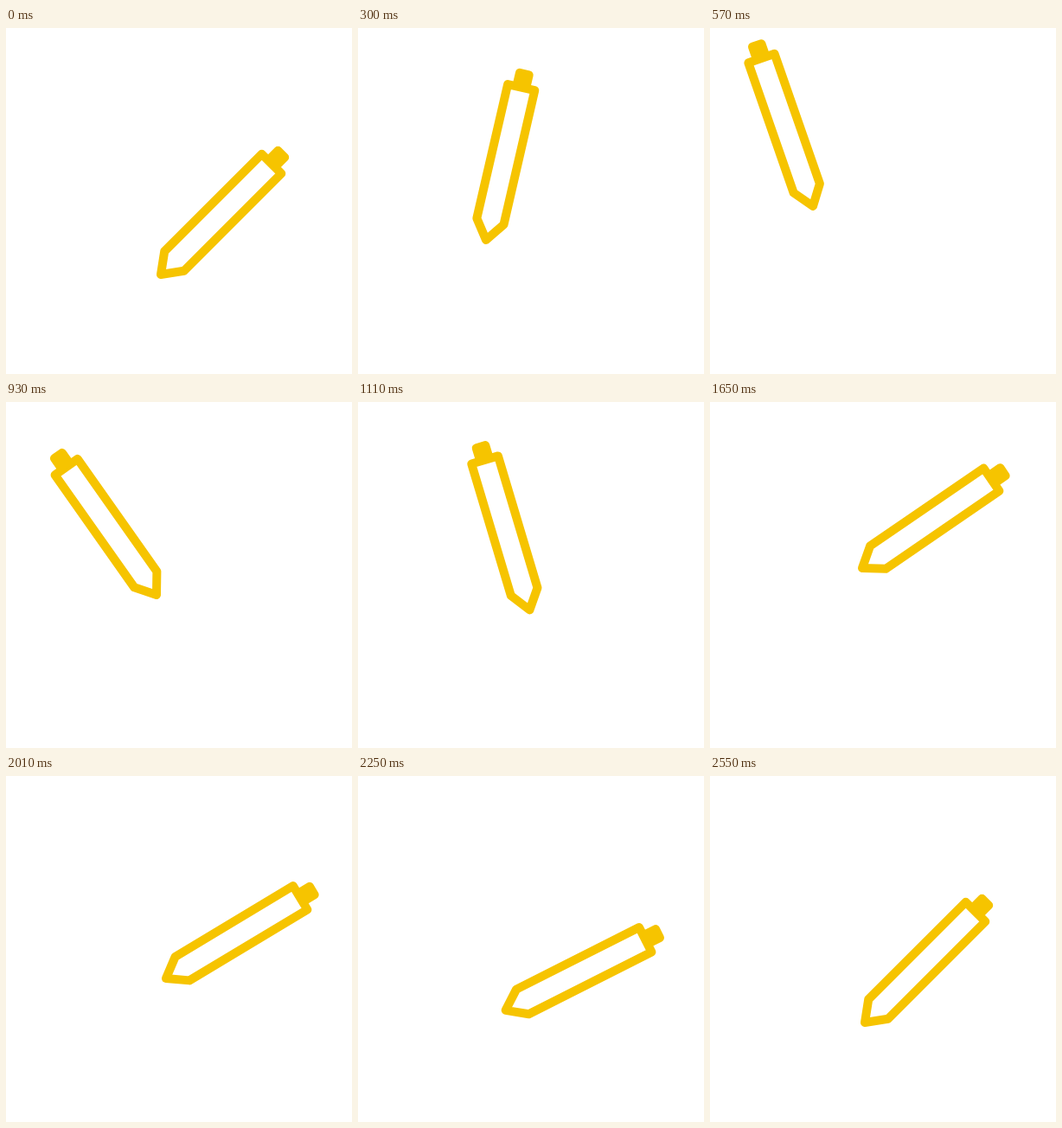
Recreate the animation shown at these times as an HTML page. Size 400 by 400 pixels, loop 3.11 s.

```html
<!DOCTYPE html>
<html lang="en">
<head>
<meta charset="utf-8">
<title>Writing pen</title>
<style>
  html, body { margin: 0; width: 100%; height: 100%; overflow: hidden; background: #fff; }
  svg { display: block; width: 100%; height: 100%; }
</style>
</head>
<body>
<svg viewBox="0 0 400 400">
  <g id="pen">
    <path d="M0 0L16-22V-181H-16V-22Z" fill="#fff" stroke="#f6c400" stroke-width="10" stroke-linejoin="round"/>
    <rect x="-10.5" y="-202" width="21" height="23" rx="5" fill="#f6c400"/>
  </g>
</svg>
<script>
  const LOOP = 3110, STEP = 30;

  // time, tip x, tip y, tilt in degrees
  const keys = [
    [0, 179, 285, 45],
    [300, 148, 245, 13],
    [540, 121, 211, -16.3],
    [570, 119, 206, -19.2],
    [690, 132, 208, -31],
    [930, 174, 223, -35.2],
    [1080, 195, 238, -21],
    [1260, 211, 247, 9],
    [1440, 200, 220, 36],
    [1560, 181, 197, 52],
    [1650, 176, 192, 55.6],
    [1770, 173, 199, 59],
    [2010, 185, 234, 59],
    [2160, 172, 262, 66],
    [2220, 170, 269, 65],
    [2550, 179, 285, 45]
  ];

  const pen = document.getElementById("pen");

  function slope(i, c) {
    const a = keys[i - 1], b = keys[i + 1];
    return a && b ? (b[c] - a[c]) / (b[0] - a[0]) : 0;
  }

  // Cubic Hermite curve through the keys
  function sample(t, c) {
    const last = keys.length - 1;
    if (t >= keys[last][0]) return keys[last][c];
    let i = 0;
    while (t >= keys[i + 1][0]) i++;
    const a = keys[i], b = keys[i + 1];
    const d = b[0] - a[0], u = (t - a[0]) / d, v = 1 - u;
    return v * v * ((1 + 2 * u) * a[c] + u * d * slope(i, c)) +
           u * u * ((1 + 2 * v) * b[c] - v * d * slope(i + 1, c));
  }

  function draw(t) {
    const [x, y, tilt] = [1, 2, 3].map(c => sample(t, c).toFixed(2));
    pen.setAttribute("transform", `translate(${x} ${y}) rotate(${tilt})`);
  }

  const start = performance.now();
  function tick() {
    const t = (performance.now() - start) % LOOP;
    draw(Math.floor(t / STEP) * STEP);
    requestAnimationFrame(tick);
  }
  draw(0);
  requestAnimationFrame(tick);
</script>
</body>
</html>
```
